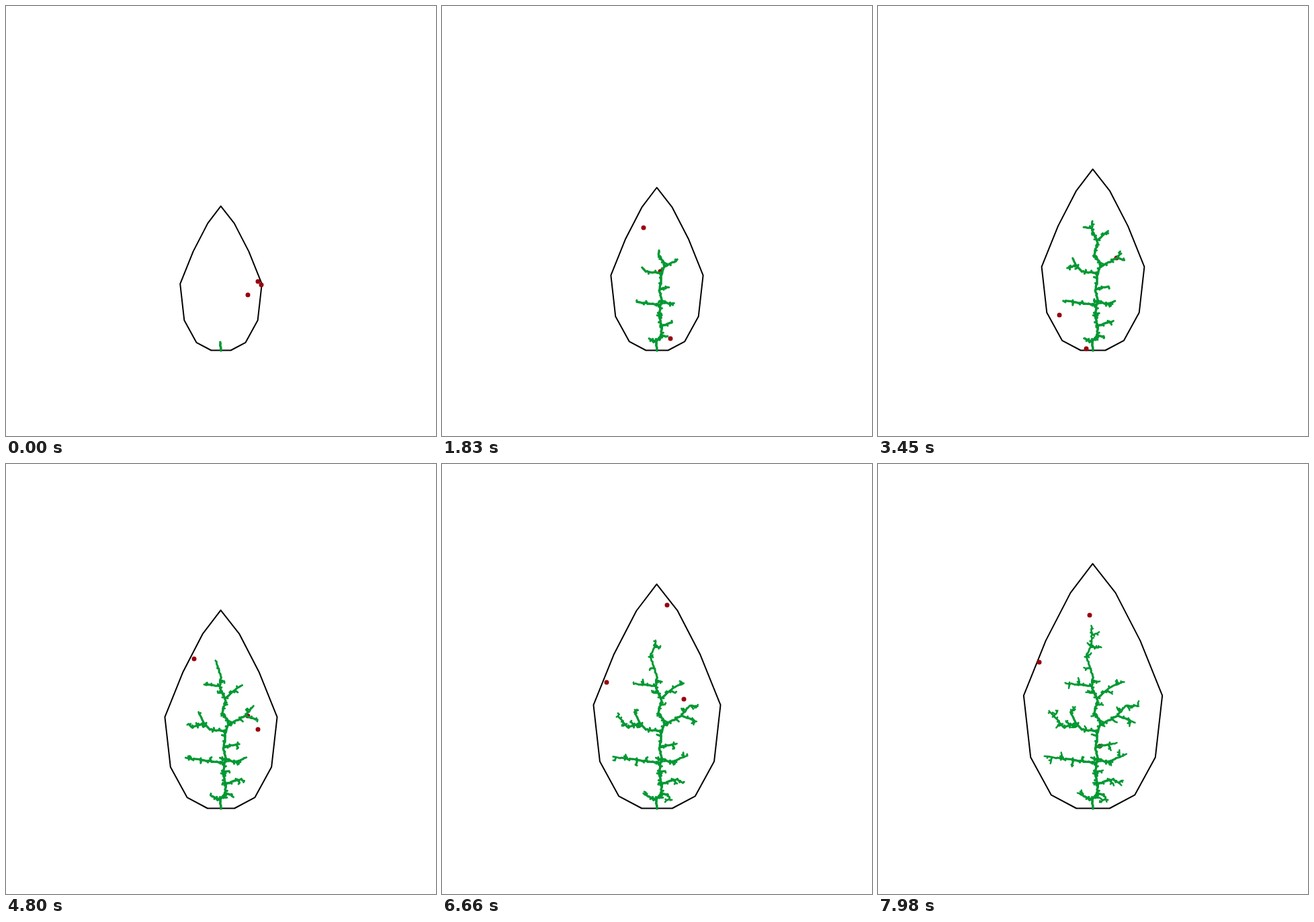
These frames come from a looping animation (640 by 640 pixels, 8 s). An HTML page with a canvas:

```html
<!DOCTYPE html>
<html lang="en">
<head>
<meta charset="utf-8">
<title>Leaf venation</title>
<style>
  html, body { margin: 0; width: 100%; height: 100%; overflow: hidden; background: #fff; }
  canvas { display: block; width: 640px; height: 640px; }
</style>
</head>
<body>
<canvas id="stage" width="640" height="640"></canvas>
<script>
const ctx = document.getElementById('stage').getContext('2d');
const LOOP = 8000, STEP = 30, LAST = Math.floor((LOOP - 1) / STEP);
const GROWTH = 1.00199;
const BASE = { x: 320, y: 512.5 };

function seeded(seed) {
  let s = seed >>> 0;
  return () => {
    s = (s + 0x6D2B79F5) >>> 0;
    let v = Math.imul(s ^ (s >>> 15), s | 1);
    v ^= v + Math.imul(v ^ (v >>> 7), v | 61);
    return ((v ^ (v >>> 14)) >>> 0) / 4294967296;
  };
}

// Right half of the blade: distance from the midrib, height above the base.
const half = [[19.7, 189.1], [41.4, 147.1], [60.8, 98.9], [54.7, 44.8], [36.6, 11.7], [14.6, 0]];
const blade = [[-0.3, 214.6], ...half, ...half.map(([x, y]) => [-x, y]).reverse()];

function leafPath(step) {
  const k = GROWTH ** step, path = new Path2D();
  for (const [x, y] of blade) path.lineTo(BASE.x + x * k, BASE.y - y * k);
  path.closePath();
  return path;
}

const rand = seeded(11);
const spread = size => (rand() - 0.5) * size;
const nodes = [];     // every vein node: position, direction and birth step
const segments = [];

function addSegment(x0, y0, x1, y1, t) {
  segments.push({ x0, y0, x1, y1, t, width: 3.4 - Math.max(t, 0) * 0.0035 });
}

// Lays small uneven pieces through the key points; growth slows with length.
function grow(points, birth, slowing) {
  const lengths = points.slice(1).map(([x, y], i) => Math.hypot(x - points[i][0], y - points[i][1]));
  const total = lengths.reduce((a, b) => a + b);
  const run = [];
  let [px, py] = points[0], before = 0;
  lengths.forEach((length, i) => {
    const [ax, ay] = points[i], [bx, by] = points[i + 1];
    const pieces = Math.max(1, Math.round(length / 2.6));
    const dir = Math.atan2(by - ay, bx - ax);
    for (let j = 1; j <= pieces; j++) {
      const f = j / pieces;
      const x = ax + (bx - ax) * f + spread(1.4), y = ay + (by - ay) * f + spread(1.4);
      const t = birth + (LAST - birth) * ((before + length * f) / total) ** slowing;
      addSegment(px, py, x, y, t);
      if (rand() < 0.35) {
        const a = dir + (rand() < 0.5 ? -1.3 : 1.3);
        addSegment(x, y, x + 2.4 * Math.cos(a), y + 2.4 * Math.sin(a), t + 3);
      }
      run.push({ x, y, t, dir });
      [px, py] = [x, y];
    }
    before += length;
  });
  nodes.push(...run);
  return run;
}

// Short twigs leave a vein on alternate sides.
function addTwigs(run, every, size) {
  let side = 1;
  for (let i = every; i < run.length; i += every) {
    const { x, y, t, dir } = run[i];
    const a = dir + side * 1.3 + spread(0.5), r = size * (0.7 + 0.6 * rand());
    grow([[x, y], [x + r * Math.cos(a), y + r * Math.sin(a)]], t, 2);
    side = -side;
  }
}

// A limb starts at the closest node already laid, at that node's birth.
function limb(...points) {
  const [x, y] = points[0];
  const distance = n => Math.hypot(n.x - x, n.y - y);
  const root = nodes.reduce((a, b) => distance(b) < distance(a) ? b : a);
  return grow([[root.x, root.y], ...points.slice(1)], root.t, 2);
}

const midrib = grow([
  [320, 513], [319, 500], [326, 490], [327, 476], [323, 460], [327, 438], [324, 424], [327, 397],
  [332, 386], [322, 369], [327, 352], [318, 331], [320, 318], [310, 285], [318, 270], [318, 241]
], -0.15, 2.5);

const limbs = [
  limb([319, 500], [311, 497], [297, 489]),
  limb([326, 490], [336, 492], [341, 503]),
  limb([327, 476], [350, 469], [362, 478]),
  limb([322, 445], [301, 442], [247, 435]),
  limb([326, 439], [340, 444], [370, 432]),
  limb([324, 422], [355, 415]),
  limb([326, 398], [303, 395], [295, 386], [277, 392], [255, 368]),
  limb([294, 385], [287, 370], [293, 362]),
  limb([332, 388], [357, 374], [368, 360], [388, 360]),
  limb([357, 374], [383, 385]),
  limb([327, 350], [344, 333], [367, 324]),
  limb([318, 331], [278, 326]),
  limb([316, 272], [333, 273])
];
addTwigs(midrib, 7, 9);
limbs.forEach(run => addTwigs(run, 6, 8));

// Three sources per step, scattered on a 5 px lattice inside the blade.
function sources(step, leaf) {
  const next = seeded(step * 7919 + 5), found = [];
  while (found.length < 3) {
    const x = 215 + 5 * Math.floor(next() * 43);
    const y = 145 + 5 * Math.floor(next() * 74);
    if (ctx.isPointInPath(leaf, x, y)) found.push([x, y]);
  }
  return found;
}

function draw(step) {
  const leaf = leafPath(step);
  ctx.fillStyle = '#fff';
  ctx.fillRect(0, 0, 640, 640);

  ctx.lineCap = ctx.lineJoin = 'round';
  ctx.strokeStyle = '#000';
  ctx.lineWidth = 2;
  ctx.stroke(leaf);

  ctx.fillStyle = '#99000d';
  for (const [x, y] of sources(step, leaf)) {
    ctx.beginPath();
    ctx.arc(x, y, 3.5, 0, 2 * Math.PI);
    ctx.fill();
  }

  ctx.strokeStyle = '#009933';
  for (const s of segments) {
    if (s.t > step) continue;
    ctx.lineWidth = s.width;
    ctx.beginPath();
    ctx.moveTo(s.x0, s.y0);
    ctx.lineTo(s.x1, s.y1);
    ctx.stroke();
  }
}

let start = null;
function tick(now) {
  if (start === null) start = now;
  draw(Math.floor(((now - start) % LOOP) / STEP));
  requestAnimationFrame(tick);
}
draw(0);
requestAnimationFrame(tick);
</script>
</body>
</html>
```
